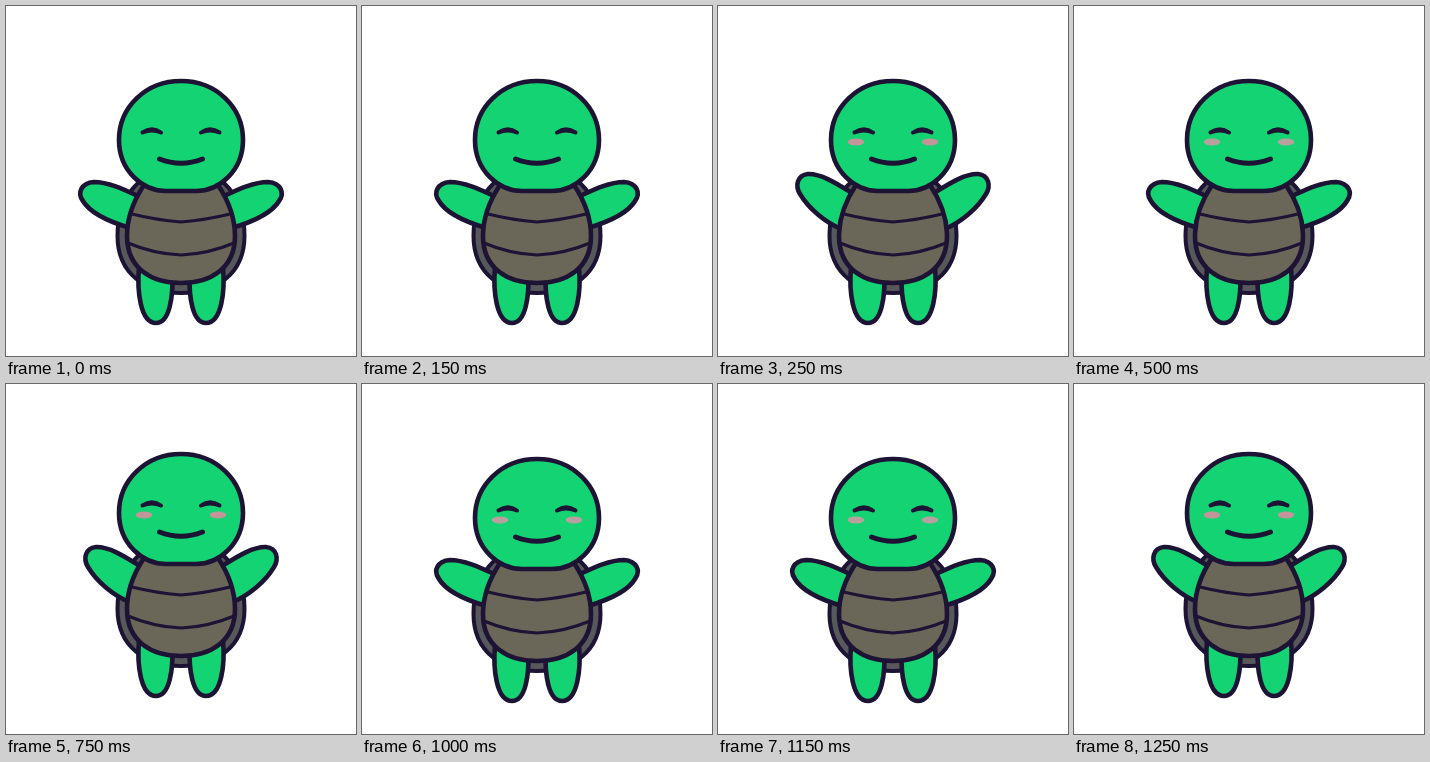
An HTML page that plays this animation: 350x350 px, repeating every 1.5 s.

```html
<!DOCTYPE html>
<html lang="en">
<head>
<meta charset="utf-8">
<title>Happy turtle</title>
<style>
  html, body { margin: 0; width: 100%; height: 100%; overflow: hidden; background: #fff; }
  svg { display: block; width: 100%; height: 100%; }
</style>
</head>
<body>
<svg viewBox="0 0 350 350">
  <defs>
    <path id="arm"/>
    <path id="leg" d="M133 262C131 284 134 317 150 317C164 317 167 290 166.500 268"/>
    <path id="eye" d="M136.500 126.500Q146 120 155 126.500Q146 122.500 136.500 126.500Z"/>
    <ellipse id="cheek" cx="138" cy="136" rx="8.3" ry="3.4"/>
  </defs>
  <g id="turtle" fill="#14d373" stroke="#1d1335" stroke-width="4.600" stroke-linecap="round" stroke-linejoin="round">
    <path fill="#57585a" stroke-width="4" d="M175 160C145 160 111.500 182 111.500 230C111.500 268 140 287 175 287C210 287 238.500 268 238.500 230C238.500 182 205 160 175 160Z"/>
    <use href="#leg"/>
    <use href="#leg" transform="matrix(-1 0 0 1 350 0)"/>
    <use href="#arm"/>
    <use href="#arm" transform="matrix(-1 0 0 1 350 0)"/>
    <path fill="#6a6658" d="M138 179C128 194 121 210 121 230C121 262 145 277 175 277C205 277 229 262 229 230C229 210 222 194 212 179Z"/>
    <path fill="none" stroke-width="3" d="M126 208Q150 214 175 216Q200 214 224 208M122 237Q148 248 175 249Q202 248 228 237"/>
    <path d="M175 75C210 75 237 101 237 134C237 165 213 185 190 185H160C137 185 113 165 113 134C113 101 140 75 175 75Z"/>
    <g id="cheeks" stroke="none">
      <use href="#cheek"/>
      <use href="#cheek" transform="matrix(-1 0 0 1 350 0)"/>
    </g>
    <g fill="#1d1335" stroke-width="4">
      <use href="#eye"/>
      <use href="#eye" transform="matrix(-1 0 0 1 350 0)"/>
      <path fill="none" stroke-width="5" d="M153.500 153Q175 161.500 196.500 153"/>
    </g>
  </g>
</svg>
<script>
  const STEP = 250, STEPS = 6;
  const ARM_LOW = "M132 190C117 183 102 176 88 176C75 177 71 187 77 195C84 207 104 216 124 222";
  const ARM_HIGH = "M134 187C121 179 104 167.500 90 168C79 169 77 180 82 188C91 203 107 216 123 223";
  const $ = id => document.getElementById(id);
  const start = performance.now();

  function draw(time) {
    const step = Math.floor(time / STEP) % STEPS;
    const raised = step % 2 === 1;
    const hopping = raised && step > 1;
    $("turtle").setAttribute("transform", `translate(0 ${hopping ? -5 : 0})`);
    $("arm").setAttribute("d", raised ? ARM_HIGH : ARM_LOW);
    $("cheeks").setAttribute("fill", raised ? "#c29599" : "#b8a09c");
    $("cheeks").setAttribute("visibility", step ? "visible" : "hidden");
  }

  function tick() {
    draw(performance.now() - start);
    requestAnimationFrame(tick);
  }
  tick();
</script>
</body>
</html>
```
